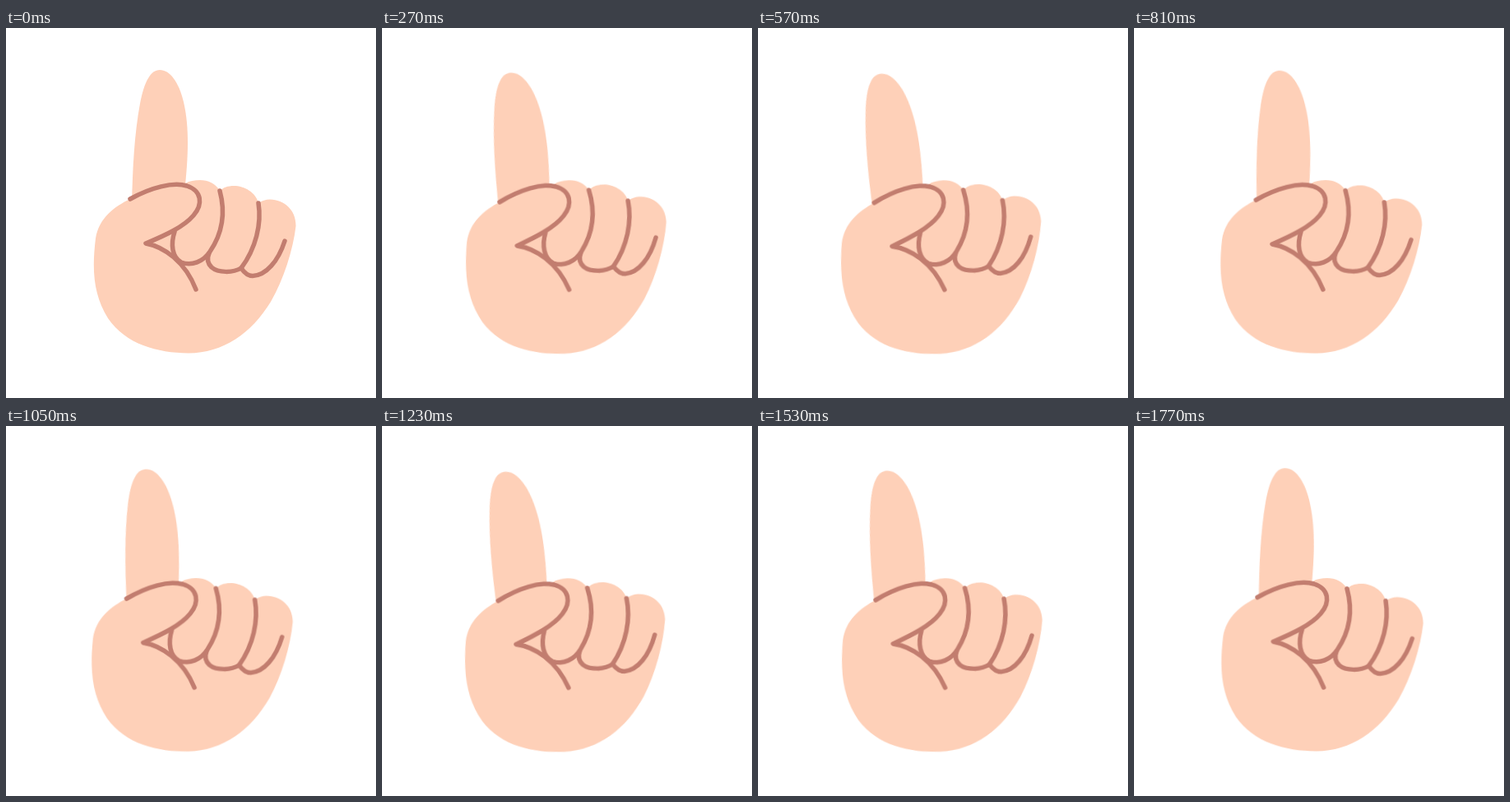
These frames come from a looping animation (450x450 px, 1.8 s). An HTML page:

```html
<!DOCTYPE html>
<html lang="en">
<head>
<meta charset="utf-8">
<title>Wagging finger</title>
<style>
  html, body { margin: 0; width: 100%; height: 100%; overflow: hidden; background: #fff; }
  svg { display: block; width: 100vw; height: 100vh; }

  /* The index finger sits inside the hand, so its swing adds to the hand's. */
  .hand, .finger { animation: wag 900ms steps(15) infinite; }
  .hand { --swing: -4deg; transform-origin: 236px 399px; }
  .finger { --swing: -8deg; transform-origin: 183.5px 256px; }

  @keyframes wag {
    0%, 100% { transform: rotate(0deg); }
    50% { transform: rotate(var(--swing)); }
  }

  .skin { fill: #fed0b8; }
  .lines { fill: none; stroke: #c27d6f; stroke-width: 5.5; stroke-linecap: round; stroke-linejoin: round; }
</style>
</head>
<body>
<svg viewBox="0 0 450 450">
  <g class="hand">
    <path class="skin finger" d="M153 215C154 170 156 130 163 92C168 65 176 51 187 51
      C199 51 210 65 216 90C223 120 222 155 217 200L185 235Z"/>
    <path class="skin" d="M151 208C132 217 113 231 109 256C104 297 107 325 124 353
      C146 385 184 395 222 395.5C264 395 298 372 322 333C338 305 349 270 352.5 241
      C353 222 339 209 321 208.5C316 208.5 311 210 307 213C304 200 290 192 277 192
      C270 192 264 194 260 198C255 189 246 185 236 185C229 185 223 186 218 189
      C200 188 170 198 151 208Z"/>
    <g class="lines">
      <!-- thumb and palm crease -->
      <path d="M151 208C176 194 203 187 220 192C238 198 240 214 228 228
        C216 242 194 252 170 262C192 266 218 284 231 318"/>
      <!-- folded fingers -->
      <path d="M260 198C267 224 263 250 248 272C240 284 226 290 213 285C202 279 200 263 205 248"/>
      <path d="M307 213C311 238 304 268 286 292C276 298 258 298 250 291C245 286 244 281 247 274"/>
      <path d="M339 259C331 284 316 301 300 301.5C295 301.5 290 298 286 292"/>
    </g>
  </g>
</svg>
</body>
</html>
```
